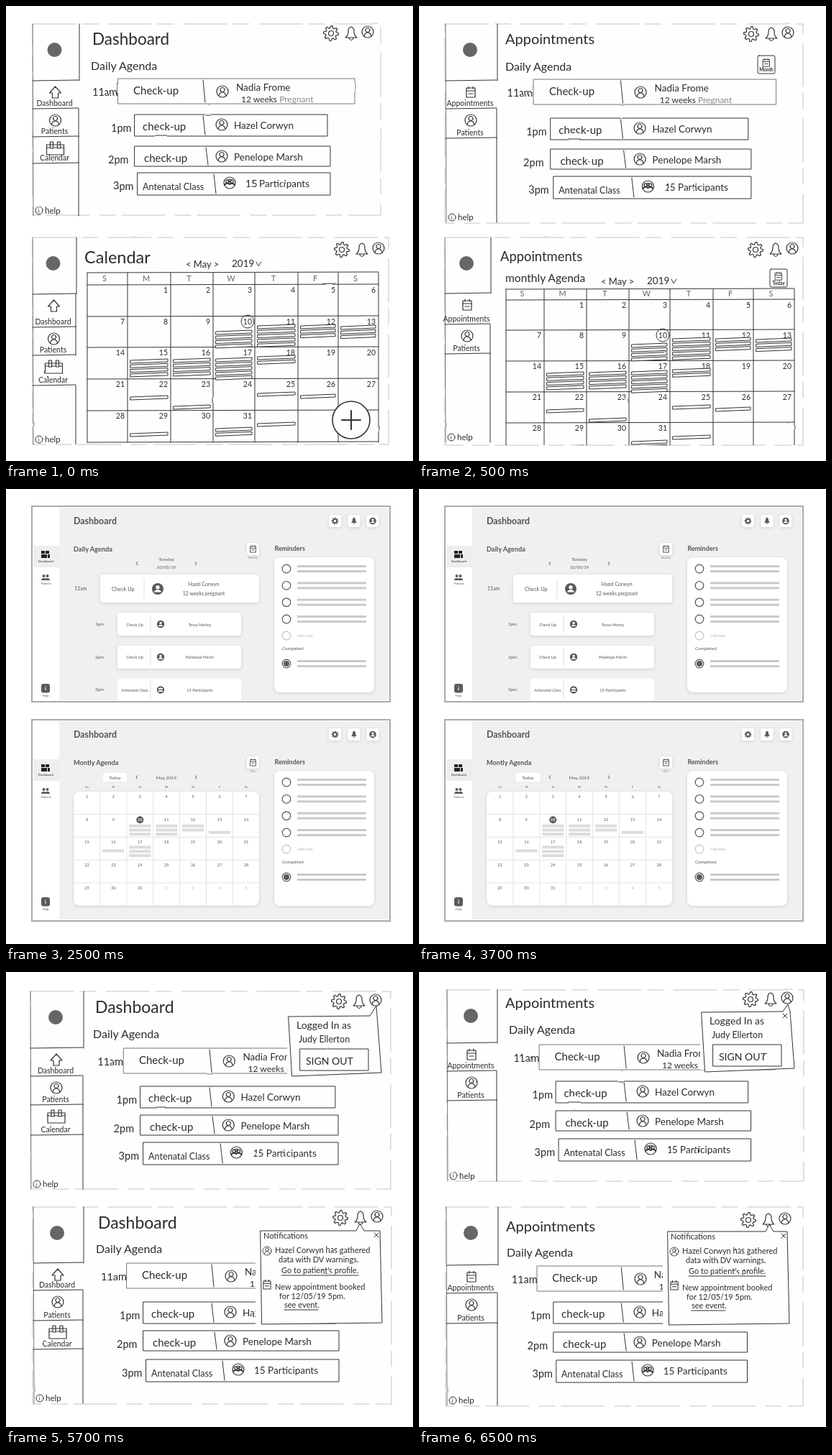
Write an HTML page that moves like this. It is 566 px wide and 633 px high and loops after 8000 ms.

```html
<!DOCTYPE html>
<html lang="en">
<head>
<meta charset="utf-8">
<title>Wireframe iterations</title>
<style>
html, body { margin: 0; width: 100%; height: 100%; overflow: hidden; background: #fff; }
svg { display: block; width: 566px; height: 633px; font-family: Lato, "Open Sans", sans-serif; }
text { fill: #2c2c2c; stroke: none; }
.sketch { fill: none; stroke: #333; stroke-linecap: round; stroke-linejoin: round; filter: url(#hand); }
.paper { fill: #fefefe; stroke: #b4b4b4; stroke-width: .8; stroke-dasharray: 60 9 22 14; }
.soft { stroke: #777; }
.cover { fill: #fefefe; }
.blank { fill: #fefefe; stroke: none; }
.clean text { fill: #555; }
.card { fill: #fff; filter: drop-shadow(0 1px 2px #0002); }
.dark { fill: #5a5a5a; }
</style>
</head>
<body>
<svg id="stage" viewBox="0 0 566 633"></svg>
<script>
const starts = [0, 500, 2500, 4500, 6500], loop = 8000;

const text = (x, y, s, size, style = '') =>
  `<text x="${x}" y="${y}" font-size="${size}" style="${style}">${s}</text>`;
const mid = (x, y, s, size, style = '') => text(x, y, s, size, 'text-anchor:middle;' + style);
const line = (d, attr = '') => `<path d="${d}" ${attr}/>`;
const rect = (x, y, x2, y2, attr = '') =>
  `<rect x="${x}" y="${y}" width="${x2 - x}" height="${y2 - y}" ${attr}/>`;
const disc = (x, y, r, attr = '') => `<circle cx="${x}" cy="${y}" r="${r}" ${attr}/>`;
const at = (x, y, s, body, attr = '') => `<g transform="translate(${x} ${y}) scale(${s})" ${attr}>${body}</g>`;
const range = n => [...Array(n).keys()];

// Icons, centred on 0,0
const gearPath = 'M' + range(32).map(i => {
  const a = i * Math.PI / 16, r = i % 4 < 2 ? 10.5 : 7.5;
  return `${(r * Math.cos(a)).toFixed(2)} ${(r * Math.sin(a)).toFixed(2)}`;
}).join('L') + 'Z';
const bellPath = 'M-8 6Q-4 3-4-3Q-4-8 0-9Q4-8 4-3Q4 3 8 6ZM-3 7Q0 12 3 7';
const head = disc(0, -2.5, 3) + line('M-5 6Q-4 1 0 1Q4 1 5 6');
const icon = {
  gear: line(gearPath) + disc(0, 0, 3.5),
  bell: line(bellPath),
  person: disc(0, 0, 8) + head,
  group: disc(0, 0, 8) + line('M-7 3Q-4-1 0 2Q4-1 7 3', 'stroke-width="2"') + disc(-3, -2, 2.2) + disc(3, -2, 2.2) + disc(0, -3, 2),
  home: line('M-8 1L0-8L8 1H4V8H-4V1Z'),
  wide: rect(-12, -5, 12, 9) + line('M-12-1H-8M-3-1H3M8-1H12') + rect(-7, -9, -3, 0) + rect(3, -9, 7, 0),
  date: rect(-6, -6, 6, 7) + line('M-6-2H6M-3-8V-5M3-8V-5M-3 2H3')
};
const put = (name, x, y, s = 1) => at(x, y, s, icon[name], 'stroke-width="1.2"');

// Hand-drawn screens
const menu = [['home', 'Dashboard'], ['person', 'Patients'], ['wide', 'Calendar']];
const shortMenu = [['date', 'Appointments'], ['person', 'Patients']];

function side(x, r, top, ys, bottom, items, active = 0) {
  const cx = (x + r) / 2 - 2;
  let out = line(`M${x} ${top}L${x + 1} ${bottom}`, 'class="soft"') + line(`M${r} ${top}V${ys[0]}`);
  out += disc(cx, top + 36, 10, 'fill="#666" stroke="none"');
  ys.forEach((y, i) => {
    out += line(`M${x} ${y}L${r - 1} ${y - 1}`);
    if (i !== active) out += line(`M${r - 1} ${y}V${ys[i + 1] || bottom}`);
  });
  items.forEach(([name, label], i) => {
    out += put(name, cx + 1, ys[i] + 16) + mid(cx, ys[i + 1] - 4, label, 10.5);
  });
  return out + disc(x + 9, bottom - 7, 5) + text(x + 7.8, bottom - 4, 'i', 8) + text(x + 17, bottom - 3, 'help', 11.5);
}

const tools = (x, y) => put('gear', x, y) + put('bell', x + 28, y) + put('person', x + 51, y - 2);
const paper = (x, y, x2, y2) => rect(x, y, x2, y2, 'class="paper"');

const rows = [
  { l: 156, r: 485, h: 35, div: 275, t: 120, when: '11am', cx: 177, what: 'Check-up', ix: 301, nx: 320, who: 'Nadia Frome', cls: 'class="soft"' },
  { l: 179, r: 447, h: 30, div: 275, t: 146, when: '1pm', cx: 190, what: 'check-up', ix: 300, nx: 317, who: 'Hazel Corwyn' },
  { l: 179, r: 451, h: 28, div: 279, t: 142, when: '2pm', cx: 192, what: 'check-up', ix: 300, nx: 317, who: 'Penelope Marsh' },
  { l: 183, r: 451, h: 31, div: 290, t: 149, when: '3pm', cx: 190, what: 'Antenatal Class', ix: 311, nx: 333, who: '15 Participants' }
];

// Columns follow x * k + a; tops gives the upper edge of each row
function agenda(a, k, tops) {
  const X = x => +(x * k + a).toFixed(1);
  return rows.map((o, i) => {
    const y = tops[i], last = i === 3;
    return rect(X(o.l), y, X(o.r), y + o.h, o.cls || '') +
      line(`M${X(o.div) - 1} ${y + 2}L${X(o.div) + 2} ${y + o.h - 2}`) +
      text(X(o.t), y + 24, o.when, 14.5) +
      text(X(o.cx), y + (last ? 24 : 22), o.what, last ? 12.6 : 15) +
      put(last ? 'group' : 'person', X(o.ix), y + (i ? 14 : 18)) +
      text(X(o.nx), y + (i ? 20 : 17), o.who, 13.5) +
      (i ? '' : text(X(327), y + 33, '12 weeks <tspan fill="#888">Pregnant</tspan>', 12));
  }).join('');
}

const heading = (x, y, s, size, ax, ay) => text(x, y, s, size) + text(ax, ay, 'Daily Agenda', 16);
const mini = (x, y, label) => rect(x, y, x + 24, y + 25, 'rx="2"') + put('date', x + 12, y + 10, .75) +
  mid(x + 12, y + 22, label, 6.5, 'font-weight:700');
const cross = (x, y) => line(`M${x - 3} ${y - 3}l6 6m0-6l-6 6`);

// [column, first y, count]
const events = [
  [3, 452, 4], [4, 444, 5], [5, 444, 3], [6, 445, 3], [1, 492, 4], [2, 491, 4], [3, 490, 5], [4, 487, 2],
  [1, 543, 1], [2, 556, 1], [4, 538, 1], [5, 541, 1], [1, 594, 1], [3, 587, 2], [4, 580, 1]
];

function month(cols, ys, dy) {
  const L = cols[0], R = cols[7], end = ys[6];
  let out = cols.map(x => line(`M${x} ${ys[0]}V${end}`)).join('') +
    ys.map(y => line(`M${L} ${y}L${R} ${y - 1}`)).join('');
  [...'SMTWTFS'].forEach((d, i) => out += mid((cols[i] + cols[i + 1]) / 2 - 4, ys[1] - 5, d, 11, 'fill:#666'));
  for (let d = 1; d < 32; d++) {
    const c = d % 7, r = (d - c) / 7;
    out += text(cols[c + 1] - 4, ys[r + 1] + 11, d, 10.5, 'text-anchor:end');
  }
  out += disc(cols[4] - 10, ys[2] + 7, 9);
  for (const [c, y, n] of events)
    for (let i = 0; i < n; i++) {
      const x = cols[c] + 4, yy = y + dy + i * 6.3;
      out += line(`M${x} ${yy + 1}L${cols[c + 1] - 4} ${yy - 1}v4L${x} ${yy + 5}Z`, 'class="cover"');
    }
  return out;
}

const monthBar = (x, y) => text(x, y, '&lt; May &gt;', 13) + text(x + 64, y - 1, '2019', 13.5) +
  line(`M${x + 98} ${y - 8}l3 6l4-6`);

const account = (y, tip) => rect(391, y, 400, y + 80, 'class="blank"') +
  line(`M393 ${y}L506 ${y - 1}L${tip[0]} ${tip[1]}L516 ${y - 1}L522 ${y + 78}L398 ${y + 83}Z`, 'class="cover"') +
  text(404, y + 17, 'Logged In as', 14) + text(407, y + 36, 'Judy Ellerton', 12.5) +
  rect(409, y + 45, 504, y + 75) + text(417, y + 67, 'SIGN OUT', 14);

function notices(x, y, tipX) {
  const note = (dx, dy, s) => text(x + dx, y + dy, s, 11);
  return rect(x - 7, y, x + 5, y + 130, 'class="blank"') +
    line(`M${x} ${y}H${tipX - 5}L${tipX} ${y - 10}L${tipX + 6} ${y}H${x + 166}L${x + 169} ${y + 128}L${x + 2} ${y + 130}Z`, 'class="cover"') +
    note(4, 11, 'Notifications') + cross(x + 161, y + 6) + put('person', x + 9, y + 28, .75) +
    note(20, 31, 'Hazel Corwyn has gathered') + note(25, 44, 'data with DV warnings.') +
    note(29, 59, 'Go to patient\'s profile.') + line(`M${x + 29} ${y + 62}H${x + 136}`) +
    put('date', x + 9, y + 75, .85) + note(20, 82, 'New appointment booked') +
    note(26, 95, 'for 12/05/19 5pm.') + note(33, 107, 'see event.') + line(`M${x + 33} ${y + 110}H${x + 80}`);
}

// Polished screens
const bold = 'font-weight:700', pale = 'fill:#b5b5b5';
const badge = (x, y, s, many) => at(x, y, s, disc(0, 0, 8, 'class="dark"') +
  (many ? disc(-3, -2, 1.8) + disc(3, -2, 1.8) + disc(0, -3, 2) + line('M-6 4Q-4 0 0 1Q4 0 6 4Z')
    : disc(0, -2.3, 2.6) + line('M-5 4.5Q-4 1 0 1Q4 1 5 4.5Z')), 'fill="#fff"');
const chevron = (x, y, d) => line(`M${x - d} ${y - 2.5}l${2 * d} 2.5l${-2 * d} 2.5`, 'fill="none" stroke="#555"');
const bars = y => rect(405, y - 5, 501, y - 2, 'fill="#cacaca"') + rect(405, y + 2, 501, y + 5, 'fill="#cacaca"');
const ring = (y, color) => disc(390, y, 5.8, `fill="none" stroke="${color}" stroke-width="1.2"`);

function shell(h, name, button) {
  let out = rect(36, 24, 534, 24 + h, 'fill="#f1efef" stroke="#aaa" stroke-width="2"') +
    rect(37.5, 25.5, 74, 22.5 + h, 'fill="#fff"') + rect(37.5, 79, 74, 109, 'fill="#eeeeee"') +
    rect(37.5, 25.5, 532.5, 22.5 + h, 'fill="none" stroke="#fff"');
  out += rect(49, 86, 54, 90, 'fill="#222"') + rect(55, 86, 60, 90, 'fill="#222"') +
    rect(49, 91, 57, 96, 'fill="#222"') + rect(58, 91, 61, 96, 'fill="#222"') + mid(55.5, 102, 'Dashboard', 4.4, 'fill:#222');
  for (const x of [52.5, 57.5]) out += disc(x, 121, 2, 'class="dark"') + line(`M${x - 3.5} 127q0-3 3.5-3t3.5 3z`, 'class="dark"');
  out += mid(55.5, 133, 'Patients', 4) + rect(49, 271, 61, 283.5, 'rx="3" class="dark"') +
    mid(55, 280, 'i', 8, 'fill:#fff;font-weight:700') + mid(55, 289, 'Help', 4.3);
  for (const x of [457.5, 484, 510]) out += rect(x - 8.5, 36, x + 8.5, 53, 'rx="3" class="card"');
  out += at(457.5, 44.5, .48, line(gearPath, 'class="dark"') + disc(0, 0, 3.5, 'fill="#fff"')) +
    at(484, 44, .5, line(bellPath, 'class="dark"')) + badge(510, 44.5, .6);
  out += text(94, 49, 'Dashboard', 12.4, bold) + text(94, 86.5, name, 9.2, bold) + text(373.5, 85.5, 'Reminders', 9, bold);
  out += rect(335, 75, 352, 92, 'rx="3" class="card"') +
    at(343.5, 83.5, .65, icon.date, 'fill="none" stroke="#555" stroke-width="1.5"') + mid(343.5, 97, button, 3.6, 'fill:#888');
  out += rect(373, 95, 512, 283, 'rx="8" class="card"');
  for (const y of [111, 134.3, 157.6, 181]) out += ring(y, '#555') + bars(y);
  out += ring(204, '#c4c4c4') + text(405, 206, 'Add new', 5.5, pale) + text(384, 224, 'Completed', 6.2) +
    ring(243, '#555') + disc(390, 243, 4, 'class="dark"') + bars(243);
  return out;
}

function dayView() {
  let out = shell(272, 'Daily Agenda', 'Monthly') + mid(223, 100, 'Tuesday', 6.1) + mid(223, 111, '10/05/19', 6.1) +
    chevron(182, 103.5, -1) + chevron(264, 103.5, 1);
  out += text(95, 141, '11am', 7) + rect(131, 119, 352, 158, 'rx="4" class="card"') + text(147, 141.5, 'Check Up', 7.4) +
    line('M192 125V153', 'stroke="#ddd"') + badge(211, 139, 1) + mid(275, 134.5, 'Hazel Corwyn', 7) + mid(275, 148, '12 weeks pregnant', 7);
  [['1pm', 'Check Up', 'Tessa Morley'], ['2pm', 'Check Up', 'Penelope Marsh'], ['3pm', 'Antenatal Class', '15 Participants']].forEach(([t, what, who], i) => {
    const y = 172 + i * 45.7;
    out += text(124, y + 18, t, 6.2) + (i < 2 ? rect(155, y, 327, y + 32, 'rx="4" class="card"')
      : line(`M155 294V${y + 4}q0-4 4-4H323q4 0 4 4V294Z`, 'fill="#fff"')) +
      mid(179, y + 18.5, what, 5.5) + line(`M201 ${y + 4}V${Math.min(y + 28, 294)}`, 'stroke="#ddd"') +
      badge(215, y + 16, .65, i === 2) + mid(269.5, y + 18.5, who, 5.5);
  });
  return out;
}

function monthView() {
  const w = 36.9, h = 31.7, top = 124;
  let out = shell(280, 'Montly Agenda', 'Date') + rect(135, 98, 168, 110, 'rx="2" fill="#fff"') + mid(151.5, 106.5, 'Today', 6.4) +
    chevron(182, 104, -1) + chevron(264, 104, 1) + mid(223, 106.5, 'May 2019', 6.4) +
    rect(94, top, 352, 282.5, 'rx="8" class="card"');
  for (let i = 1; i < 7; i++) out += line(`M${94 + i * w} ${top}v158.5`, 'stroke="#e4e4e4"');
  for (let i = 1; i < 5; i++) out += line(`M94 ${top + i * h}h258`, 'stroke="#e4e4e4"');
  ['Su', 'M', 'Tu', 'W', 'Th', 'F', 'Sa'].forEach((d, i) => out += mid(112.5 + i * w, 119, d, 4.2));
  const booked = { 10: [18, 3], 11: [18, 3], 12: [18, 2], 13: [27, 1], 16: [21, 1], 17: [16, 3] };
  for (let i = 0; i < 35; i++) {
    const x = 112.5 + i % 7 * w, y = top + Math.floor(i / 7) * h, d = i + 1, today = d === 10;
    if (today) out += disc(x, y + 7.5, 5, 'class="dark"');
    out += mid(x, y + 9, d > 31 ? d - 30 : d, 5.5, today ? 'fill:#fff;font-weight:700' : d > 31 ? pale : '');
    const [dy, n] = booked[d] || [0, 0];
    for (let j = 0; j < n; j++) out += rect(x - 15, y + dy - 4 + j * 5.8, x + 15, y + dy + j * 5.8, 'fill="#dcdcdc"');
  }
  return out;
}

const scenes = [
  paper(37, 25, 521, 291) + side(37, 102, 25, [104, 143, 182, 219], 292, menu) + tools(452, 38) +
  heading(120, 54, 'Dashboard', 22.5, 118, 89) + agenda(0, 1, [101, 151, 195, 232]) +
  paper(37, 322, 532, 610) + side(37, 98, 322, [401, 447, 486, 528], 610, menu, 2) + tools(467, 339) +
  text(109, 358, 'Calendar', 23.5) + monthBar(250, 364) +
  month([113, 169, 229, 288, 346, 406, 462, 518], [371, 388, 432, 475, 519, 563, 607], 0) +
  disc(480, 576, 26, 'class="cover" stroke-width="1.6"') + line('M467 576H493M480 563V589', 'stroke-width="2"'),

  paper(36, 25, 534, 302) + side(37, 109, 25, [104, 143, 184], 301, shortMenu) + tools(462, 39) +
  heading(120, 53, 'Appointments', 20, 120, 90) + mini(471, 69, 'Month') + agenda(-.4, 1.025, [102, 156, 199, 237]) +
  paper(36, 322, 534, 611) + side(36, 100, 322, [400, 443, 484], 607, shortMenu) + tools(468, 339) +
  text(113, 355, 'Appointments', 18.4) + text(120, 384, 'monthly Agenda', 15.6) + monthBar(253, 388) + mini(488, 366, 'Today') +
  `<g clip-path="url(#cut)">${month([121, 174, 233, 292, 349, 409, 465, 522], [394, 409, 451, 494, 537, 580, 624], 18)}</g>`,

  dayView() + at(0, 297, 1, monthView()),

  paper(34, 27, 535, 302) + side(34, 108, 27, [106, 145, 185, 227], 302, menu) + tools(463, 41) +
  heading(124, 57, 'Dashboard', 23, 121, 92) + agenda(6, 1.011, [106, 159, 199, 237]) + account(62, [515, 47]) +
  paper(37, 327, 536, 601) + side(38, 108, 327, [405, 443, 485, 525], 600, menu) + tools(465, 342) +
  heading(128, 357, 'Dashboard', 23, 125, 391) + agenda(12, 1, [405, 459, 499, 539]) + notices(354, 360, 492),

  paper(39, 25, 535, 291) + side(39, 109, 25, [99, 138, 179], 291, shortMenu) + tools(461, 38) +
  heading(120, 50, 'Appointments', 20, 125, 86) + agenda(12, .997, [101, 152, 193, 232]) + account(56, [513, 45]) + cross(509, 61) +
  paper(37, 327, 534, 604) + side(38, 110, 327, [408, 447, 489], 603, shortMenu) + tools(458, 345) +
  heading(121, 361, 'Appointments', 20, 122, 396) + agenda(10, .99, [409, 459, 501, 540]) + notices(346, 361, 487)
];

const stage = document.getElementById('stage');
stage.innerHTML = `<defs>
  <filter id="hand" filterUnits="userSpaceOnUse" x="0" y="0" width="566" height="633" color-interpolation-filters="sRGB">
    <feTurbulence type="fractalNoise" baseFrequency=".03" numOctaves="1" seed="4"/>
    <feDisplacementMap in="SourceGraphic" scale="2" xChannelSelector="R" yChannelSelector="G"/>
  </filter>
  <clipPath id="cut">${rect(36, 322, 534, 611)}</clipPath></defs>` +
  scenes.map((s, i) => `<g class="scene ${i === 2 ? 'clean' : 'sketch'}">${s}</g>`).join('');
const groups = stage.querySelectorAll('.scene');

function frame() {
  const t = performance.now() % loop;
  const now = starts.filter(s => s <= t).length - 1;
  groups.forEach((g, i) => g.style.display = i === now ? '' : 'none');
  requestAnimationFrame(frame);
}
frame();
</script>
</body>
</html>
```
